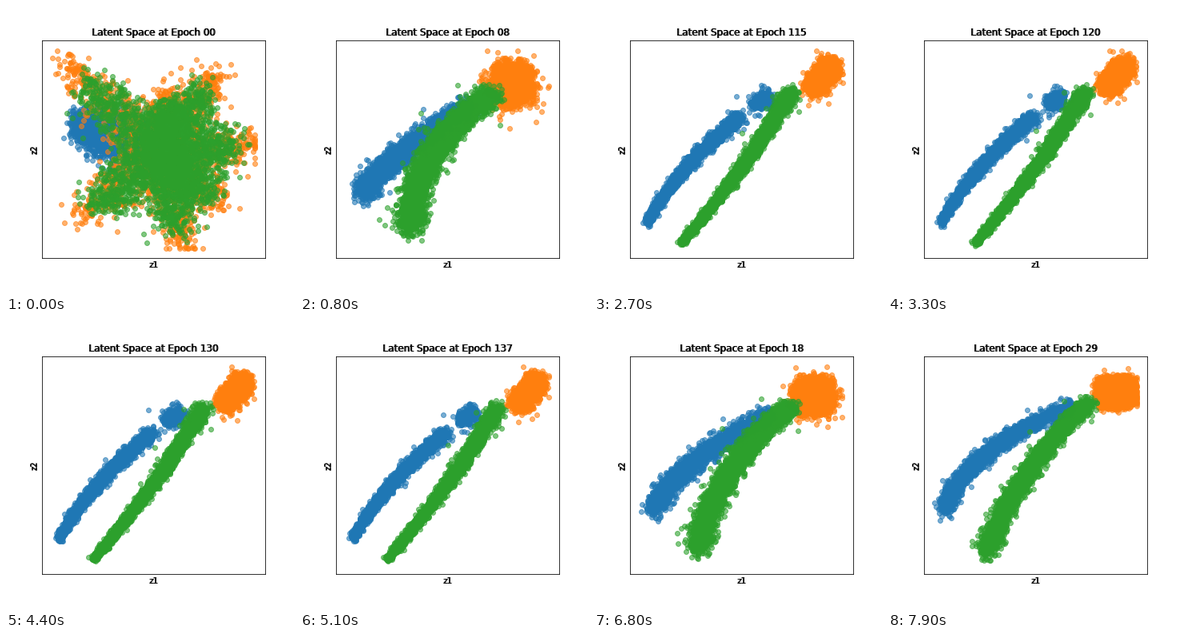
Animation of 360x360 px, one loop 8 s. Source, as a matplotlib script:

```python
import numpy as np
import matplotlib.pyplot as plt
from matplotlib.animation import FuncAnimation

plt.rcParams["font.family"] = "DejaVu Sans"

FRAMES, INTERVAL = 80, 100
# Epoch labels play in string order: 00 ... 10, 100 ... 109, 11, 110 ...
LABELS = sorted(f"{i:02d}" for i in range(150))[:FRAMES]
LOW, HIGH = (57.7, 55.5), (311.3, 302.6)

# Each class is noise around a quadratic Bezier curve that drifts between
# three key epochs: three control points, then the spread at both ends.
KEY_EPOCHS = [8, 29, 100]
BLUE = [[77, 232, 121, 181, 208, 126, 7.2, 6],
        [70, 233, 102, 156, 226, 106, 5, 4.2],
        [66, 270, 118, 180, 222, 109, 2.3, 5]]
ORANGE = [[262, 100, 264, 98, 267, 95, 12, 12],
          [275, 88, 285, 88, 295, 87, 8.5, 8.5],
          [274, 101, 285, 89, 296, 74, 6, 6]]
GREEN = [[137, 277, 141, 177, 236, 113, 8.5, 7],
         [122, 287, 163, 181, 248, 103, 6, 4.5],
         [109, 296, 183, 211, 244, 110, 1.8, 4.8]]

# The untrained start is a star: arms from one core that thin out to the tips.
CORE = np.array([192, 188])
TIPS = [(72, 70), (205, 112), (262, 88), (308, 172), (268, 245), (223, 296), (92, 262)]
BLUE_TIP = [(98, 147)]


class Cloud:
    def __init__(self, keys, tips, reach, power, count, seed, gap=0, boxy=0):
        rng = np.random.default_rng(seed)
        self.keys, self.seed, self.gap, self.boxy = np.array(keys), seed, gap, boxy
        self.u = rng.random(count)
        self.noise = rng.normal(size=(count, 2))
        self.noise[rng.random(count) < 0.015] *= 1.9
        arm = np.array(tips)[rng.integers(len(tips), size=count)] - CORE
        r = reach * rng.random((count, 1)) ** power
        self.start = CORE + arm * r + rng.normal(size=(count, 2)) * (23 - 14 * r)

    def split(self, late):
        """Pull the far end of the curve apart into its own small cluster."""
        g = self.gap * late
        tip = 0.94 + (self.u - 0.925) * (1 - 0.5 * g)
        return np.where(self.u > 0.85, tip, self.u * (1 - 0.06 * g))

    def at(self, epoch):
        key = [np.interp(epoch, KEY_EPOCHS, col) for col in self.keys.T]
        a, b, c = np.reshape(key[:6], (3, 2))
        u = self.split(np.interp(epoch, KEY_EPOCHS, [0, 0, 1]))[:, None]
        curve = (1 - u) ** 2 * a + 2 * u * (1 - u) * b + u ** 2 * c

        fresh = np.random.default_rng(1000 * self.seed + epoch).normal(size=self.noise.shape)
        n = 0.92 * self.noise + 0.39 * fresh
        q = self.boxy * np.exp(-((epoch - 29) / 12) ** 2)
        n = n * (1 - q) + 2.4 * np.tanh(0.75 * n) * q
        pos = curve + n * (key[6] + (key[7] - key[6]) * u)
        pos += (self.start - pos) * np.exp(-epoch / 1.2)
        return np.clip(pos, LOW, HIGH)


clouds = {
    "C0": Cloud(BLUE, BLUE_TIP, 1, 0.35, 2500, 1, gap=1),
    "C1": Cloud(ORANGE, TIPS, 1, 1, 2400, 3, boxy=0.6),
    "C2": Cloud(GREEN, TIPS, 0.75, 0.9, 3200, 4),
}

fig = plt.figure(figsize=(5, 5), dpi=72, facecolor="white")
ax = fig.add_axes([0.125, 0.125, 0.775, 0.755])
ax.set(xlim=(45, 324), ylim=(315, 43.2), xticks=[], yticks=[])

dots = {c: ax.plot([], [], "o", color=c, ms=6, mew=1, alpha=0.6)[0] for c in clouds}


def heavy(text, xy, offset, size, **kw):
    """Draw a label twice, one pixel apart, for thicker strokes."""
    x, y = offset
    return [ax.annotate(text, xy, (x + dx, y), xycoords="axes fraction",
                        textcoords="offset points", fontsize=size, ha="center", **kw)
            for dx in (-0.5, 0.5)]


title = heavy("", (0.5, 1), (0, 6), 12, va="baseline")
heavy("z1", (0.5, 0), (0, -4), 10, va="top")
heavy("z2", (0, 0.5), (-4, 0), 10, va="bottom", rotation=90, rotation_mode="anchor")


def update(frame):
    label = LABELS[frame]
    for t in title:
        t.set_text(f"Latent Space at Epoch {label}")
    for color, line in dots.items():
        line.set_data(*clouds[color].at(int(label)).T)
    return [*dots.values(), *title]


anim = FuncAnimation(fig, update, frames=FRAMES, interval=INTERVAL, repeat=True, repeat_delay=0)
plt.show()
```
